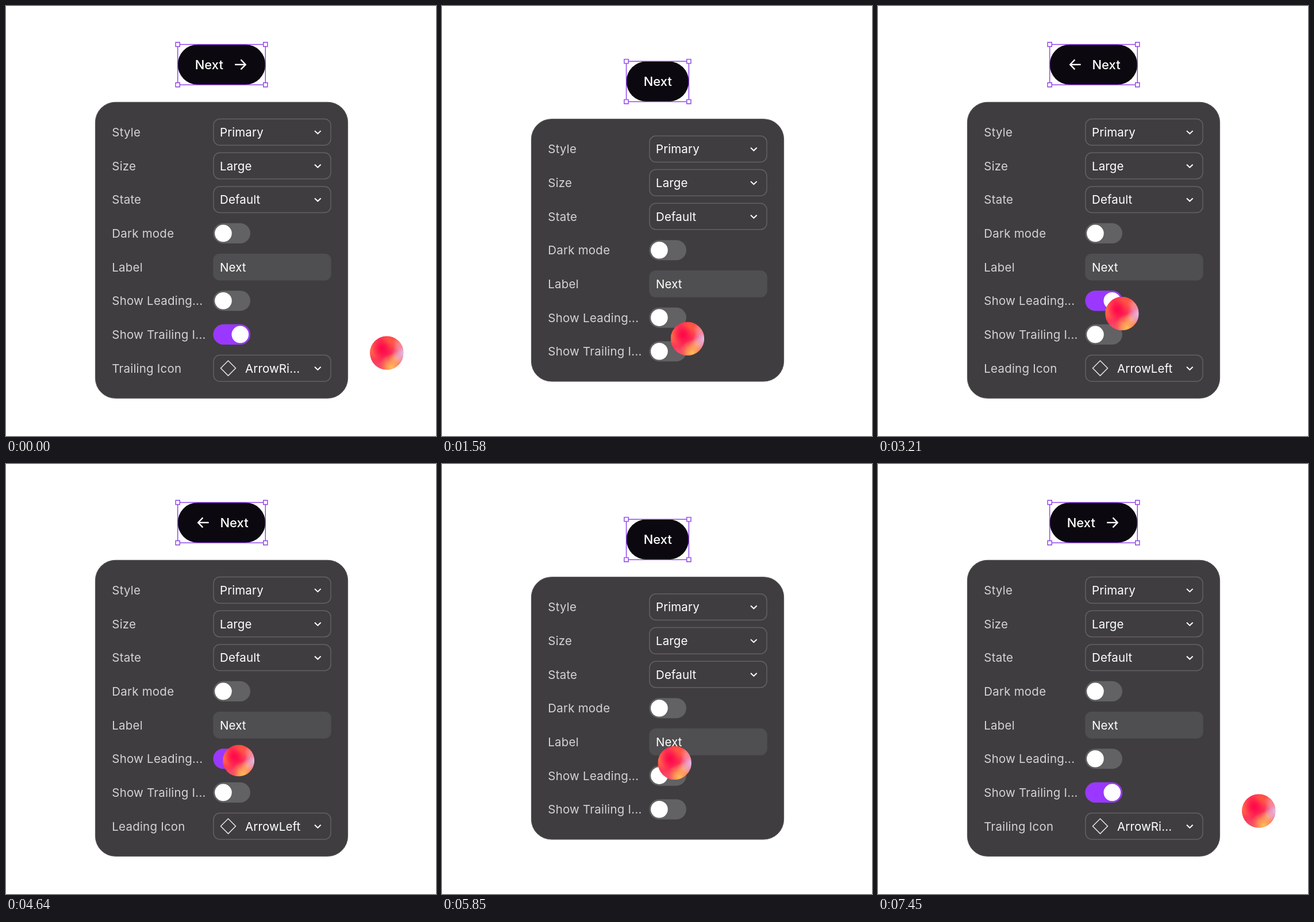
Write an HTML page with a canvas that moves like this. It is 748x748 px and loops after 7.51 s.

```html
<!DOCTYPE html>
<html lang="en">
<head>
<meta charset="utf-8">
<title>Button properties</title>
<style>
html, body { margin: 0; width: 100%; height: 100%; overflow: hidden; background: #fff; }
canvas { display: block; width: 748px; height: 748px; }
</style>
</head>
<body>
<canvas id="stage"></canvas>
<script>
const SIZE = 748, LOOP = 7510, PITCH = 58.67, GAP = 29.33;
const PURPLE = '#9a38ff', OUTLINE = '#8d3cec';
const canvas = document.getElementById('stage');
const ctx = canvas.getContext('2d');
const dpr = window.devicePixelRatio || 1;
canvas.width = canvas.height = SIZE * dpr;

const clamp = v => Math.min(1, Math.max(0, v));
const mix = (a, b, p) => a + (b - a) * p;
const inOut = p => p < .5 ? 4 * p ** 3 : 1 - (2 - 2 * p) ** 3 / 2;
const out = p => 1 - (1 - p) ** 3;
const span = (t, a, b, ease = inOut) => ease(clamp((t - a) / (b - a)));

// Pointer moves: start, end, x, y, easing
const MOVES = [
  [40, 800, 407.5, 573, inOut],
  [1020, 1620, 427, 578.8, out],
  [1640, 2340, 407, 547, inOut],
  [2520, 3320, 424.5, 535, out],
  [3940, 4650, 404.6, 516, inOut],
  [5720, 6290, 407, 597, inOut],
  [6430, 7180, 662.3, 603.5, inOut]
];
const PRESSES = [860, 2340, 4600, 6270];

function pointer(t) {
  let x = 662.3, y = 603.5;
  for (const [a, b, tx, ty, ease] of MOVES) {
    const p = span(t, a, b, ease);
    x = mix(x, tx, p);
    y = mix(y, ty, p);
  }
  let scale = 1;
  for (const a of PRESSES) scale -= .1 * Math.sin(Math.PI * clamp((t - a) / 200));
  return { x, y, r: 29.2 * scale };
}

function box(x, y, w, h, r, fill, stroke, width = 1.5) {
  ctx.beginPath();
  ctx.roundRect(x, y, w, h, r);
  if (fill) { ctx.fillStyle = fill; ctx.fill(); }
  if (stroke) { ctx.strokeStyle = stroke; ctx.lineWidth = width; ctx.stroke(); }
}

function disc(x, y, r, fill) {
  ctx.beginPath();
  ctx.arc(x, y, r, 0, Math.PI * 2);
  ctx.fillStyle = fill;
  ctx.fill();
}

function line(points, width, color = '#fff', close = false) {
  ctx.beginPath();
  points.forEach(([x, y]) => ctx.lineTo(x, y));
  if (close) ctx.closePath();
  ctx.strokeStyle = color;
  ctx.lineWidth = width;
  ctx.stroke();
}

function text(str, x, y, color = '#fff', size = 20.53, weight = 400, spacing = 0.1) {
  ctx.font = `${weight} ${size}px Inter, sans-serif`;
  ctx.letterSpacing = spacing + 'px';
  ctx.fillStyle = color;
  ctx.fillText(str, x, y + size * .364);
}

function faded(alpha, draw) {
  if (alpha <= 0) return;
  ctx.save();
  ctx.globalAlpha *= alpha;
  draw();
  ctx.restore();
}

const label = (str, y) => text(str, 184.3, y, '#d3d2d4', 20.53, 400, .2);

function select(str, y, icon) {
  box(361, y - 22.8, 204, 45.6, 11, null, '#626163');
  text(str, icon ? 416 : 372, y);
  line([[537, y - 2.3], [542.3, y + 2.8], [547.6, y - 2.3]], 2);
  if (icon) line([[386.5, y - 13], [399.5, y], [386.5, y + 13], [373.5, y]], 1.5, '#e4e3e5', true);
}

function toggle(y, on) {
  box(360.5, y - 17.6, 64.5, 35.2, 17.6, '#626163');
  faded(on, () => box(360.5, y - 17.6, 64.5, 35.2, 17.6, PURPLE));
  disc(mix(378, 407.3, on), y, 14.8, '#fff');
}

function arrow(x, y, dir) {
  const tip = x + 9 * dir, back = x + .8 * dir;
  line([[x - 9.5 * dir, y], [tip, y]], 2.4);
  line([[back, y - 8.5], [tip, y], [back, y + 8.5]], 2.4);
}

function button(trail, lead, top) {
  const tall = Math.max(trail, lead);
  const half = mix(54.4, 76.3, tall), left = 375 - half, y = top + 35;
  box(left, top, half * 2, 70, 35, '#0b090f');
  text('Next', 350.7 - 22 * trail + 21.7 * lead, y - .2, '#fff', 22, 500, 0);
  faded(trail, () => arrow(left + 109, y, 1));
  faded(lead, () => arrow(left + 44.5, y, -1));
  ctx.strokeStyle = OUTLINE;
  ctx.lineWidth = 1.4;
  ctx.strokeRect(left, top, half * 2, 70.2);
  for (const cx of [left, left + half * 2])
    for (const cy of [top, top + 70.2]) box(cx - 3.6, cy - 3.6, 7.2, 7.2, 0, '#fff', OUTLINE, 1.4);
}

function panel(trail, lead, shift) {
  const tall = Math.max(trail, lead);
  const top = 167 + shift, height = 457 + 2 * GAP * tall;
  const row = i => 219.4 + shift + PITCH * i;
  box(155.4, top + .3, 439.2, height - .6, 35, '#3f3d40', '#59575a', 1);
  ctx.save();
  ctx.beginPath();
  ctx.roundRect(155, top, 440, height, 35);
  ctx.clip();
  [['Style', 'Primary'], ['Size', 'Large'], ['State', 'Default']].forEach(([name, value], i) => {
    label(name, row(i));
    select(value, row(i));
  });
  label('Dark mode', row(3));
  toggle(row(3), 0);
  label('Label', row(4));
  box(360.3, row(4) - 23.4, 205.4, 46.8, 11.5, '#4f4e50');
  text('Next', 372, row(4));
  label('Show Leading...', row(5));
  toggle(row(5), lead);
  label('Show Trailing I...', row(6));
  toggle(row(6), trail);
  const extra = (alpha, name, value) => faded(alpha, () => {
    label(name, row(7));
    select(value, row(7), true);
  });
  extra(trail, 'Trailing Icon', 'ArrowRi...');
  extra(lead, 'Leading Icon', 'ArrowLeft');
  ctx.restore();
}

// Soft colour spots inside the ball: x, y, radius (in ball radii), rgb, alpha
const SPOTS = [
  [-.95, -.2, .8, '255,112,72', .9],
  [.25, -.75, .75, '255,92,62', .9],
  [.3, .85, .8, '255,190,88', 1],
  [.55, .35, .45, '255,176,112', .8],
  [1.02, .02, .72, '226,196,236', 1],
  [.75, -.55, .45, '250,150,150', .8],
  [-.3, -.25, .6, '255,0,72', .9],
  [-.55, .8, .5, '240,92,110', .7]
];

function ball({ x, y, r }) {
  ctx.save();
  ctx.translate(x, y);
  ctx.scale(r, r);
  ctx.beginPath();
  ctx.arc(0, 0, 1, 0, Math.PI * 2);
  ctx.clip();
  ctx.fillStyle = '#ff2a56';
  ctx.fillRect(-1, -1, 2, 2);
  for (const [sx, sy, sr, rgb, a] of SPOTS) {
    const g = ctx.createRadialGradient(sx, sy, 0, sx, sy, sr);
    g.addColorStop(0, `rgba(${rgb},${a})`);
    g.addColorStop(.45, `rgba(${rgb},${a * .65})`);
    g.addColorStop(1, `rgba(${rgb},0)`);
    ctx.fillStyle = g;
    ctx.fillRect(-1, -1, 2, 2);
  }
  ctx.restore();
}

function draw(t) {
  const trail = 1 - span(t, 930, 1500) + span(t, 6370, 6980);
  const lead = span(t, 2440, 3130) - span(t, 4720, 5350);
  const shift = GAP * (1 - Math.max(trail, lead));
  ctx.setTransform(dpr, 0, 0, dpr, 0, 0);
  ctx.fillStyle = '#fff';
  ctx.fillRect(0, 0, SIZE, SIZE);
  button(trail, lead, 66.9 + shift);
  panel(trail, lead, shift);
  ball(pointer(t));
}

const start = performance.now();
function tick() {
  draw((performance.now() - start) % LOOP);
  requestAnimationFrame(tick);
}
tick();
</script>
</body>
</html>
```
